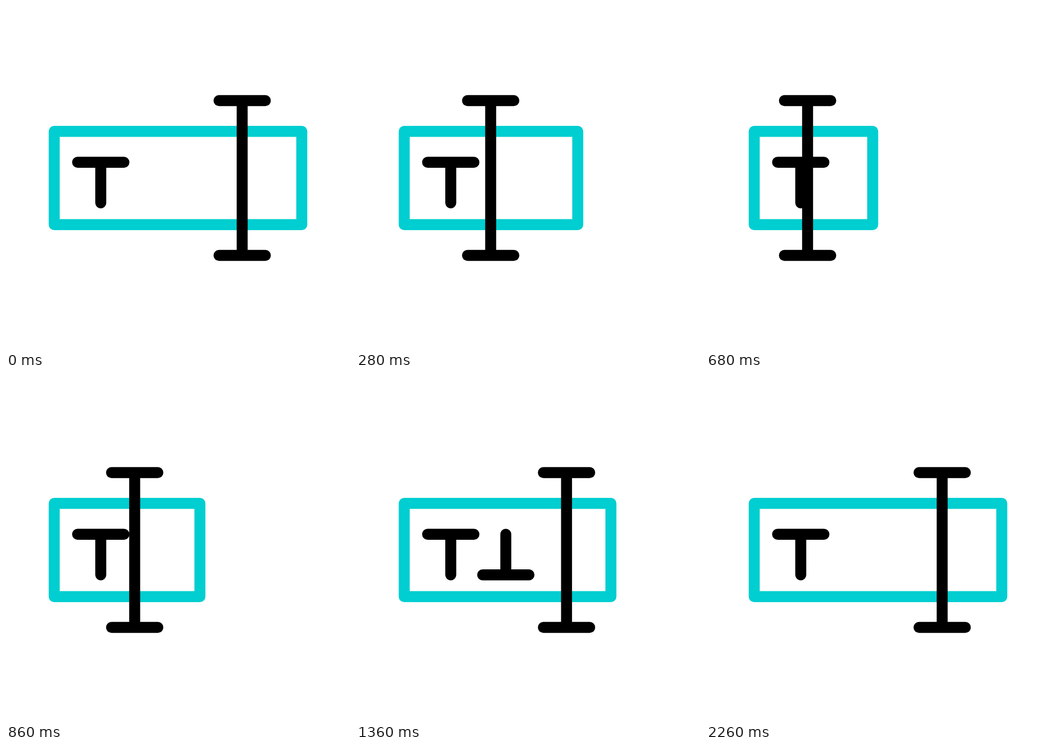
Recreate the animation shown at these times as an HTML page with a canvas. Size 640 px wide and 640 px high, loop 2400 ms.

```html
<!DOCTYPE html>
<html lang="en">
<head>
<meta charset="utf-8">
<title>Text field</title>
<style>
  html, body { margin: 0; width: 100%; height: 100%; overflow: hidden; background: #fff; }
  canvas { display: block; width: 100vmin; height: 100vmin; }
</style>
</head>
<body>
<canvas id="stage" width="640" height="640"></canvas>
<script>
const ctx = document.getElementById('stage').getContext('2d');
const LOOP = 2400, STEP = 20;
const TEAL = '#00ced0', BLACK = '#000';
const ARM = 43.1, LEFT = 89.7, TOP = 233.3, HIGH = 290.8, LOW = 366.3;

// share of the time from a to b that has passed
const span = (t, a, b) => Math.min(1, Math.max(0, (t - a) / (b - a)));

// sweeps left, then steps right past one letter at a time
const cursorX = t => 439.4 - 312 * span(t, 4, 460)
  + 112 * span(t, 460, 860) + 94 * span(t, 860, 1140) + 106 * span(t, 1140, 1540);

// shrinks, makes room for two letters, then for the third
const edgeX = t => 550.3 - 274.5 * span(t, 0, 558)
  + 105.5 * span(t, 558, 933) + 169 * span(t, 1140, 1540);

function line(x0, y0, x1, y1, cap = 'round') {
  ctx.lineCap = cap;
  ctx.beginPath();
  ctx.moveTo(x0, y0);
  ctx.lineTo(x1, y1);
  ctx.stroke();
}

function bar(x, y) {
  line(x - ARM, y, x + ARM, y);
}

function letter(x, y, foot) {
  bar(x, y);
  line(x, y + Math.sign(foot - y) * 5, x, foot);
}

function cursor(x) {
  bar(x, 176);
  bar(x, 464);
  line(x, 176, x, 464, 'butt');
}

function draw(t) {
  ctx.fillStyle = '#fff';
  ctx.fillRect(0, 0, 640, 640);
  ctx.lineWidth = 20.4;
  ctx.lineJoin = 'round';

  ctx.strokeStyle = TEAL;
  ctx.strokeRect(LEFT, TOP, edgeX(t) - LEFT, 640 - 2 * TOP);

  ctx.strokeStyle = BLACK;
  letter(176.3, HIGH, LOW);
  if (t >= 1100 && t < 2260) letter(278.7, LOW, HIGH);
  if (t >= 1500 && t < 1960) letter(384.3, HIGH, LOW);
  cursor(cursorX(t));
}

const start = performance.now();
function tick() {
  const t = (performance.now() - start) % LOOP;
  draw(Math.floor(t / STEP) * STEP);
  requestAnimationFrame(tick);
}
tick();
</script>
</body>
</html>
```
